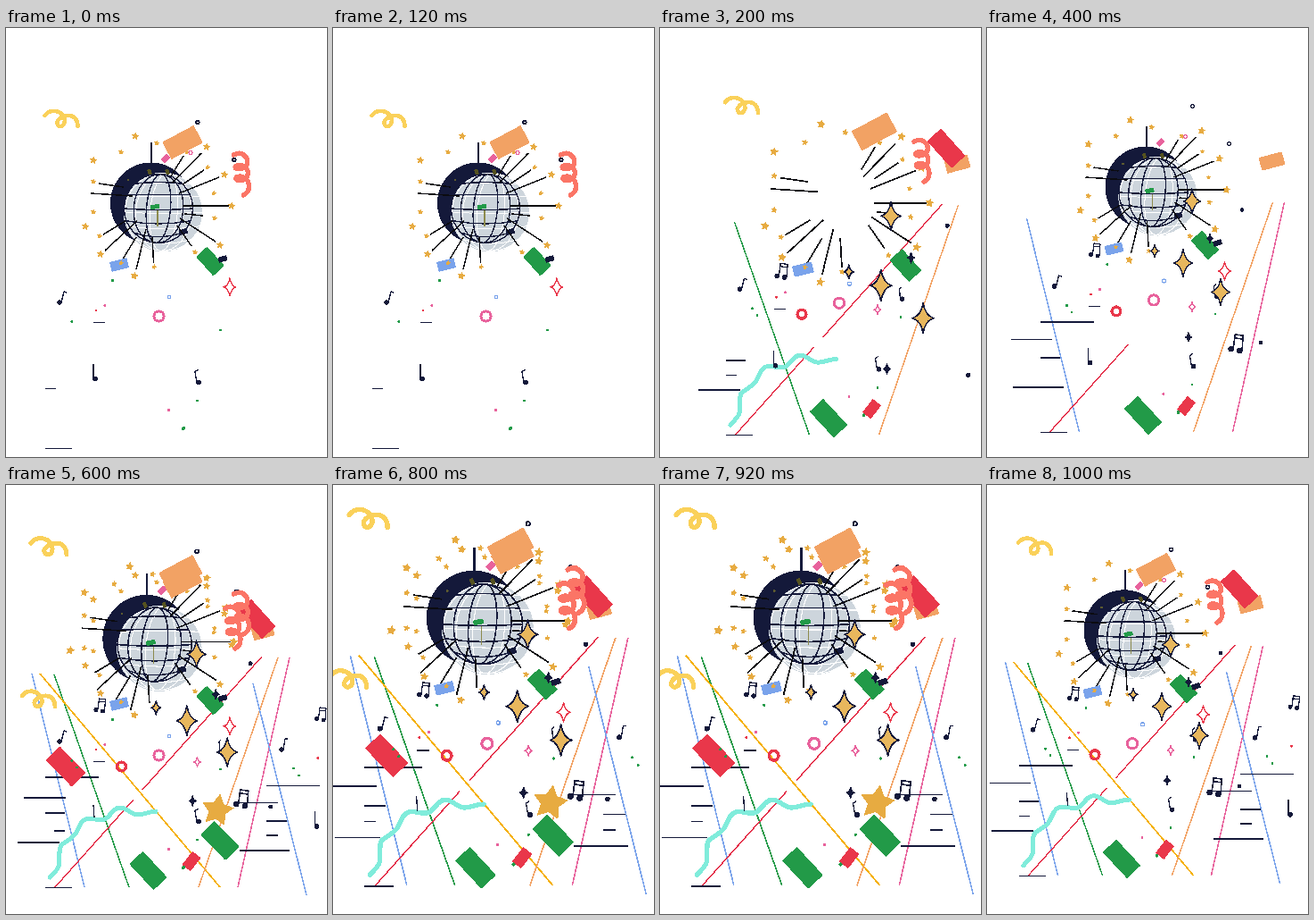
Write an HTML page that moves like this. It is 360x480 px and loops after 1200 ms.

```html
<!DOCTYPE html>
<html lang="en">
<head>
<meta charset="utf-8">
<title>Disco party</title>
<style>
html, body { margin: 0; width: 100%; height: 100%; overflow: hidden; background: #fff; }
svg { display: block; width: 100%; height: 100%; }
</style>
</head>
<body>
<svg id="stage" viewBox="0 0 360 480" shape-rendering="crispEdges"></svg>
<script>
(() => {
const NAVY = '#14193a', GOLD = '#e7ab41', GREEN = '#229a48', RED = '#e9374a';
const ORANGE = '#f2a264', PINK = '#e8629c', BLUE = '#7aa3eb', AQUA = '#80ecdb';
const YELLOW = '#fad15a', CORAL = '#fb7566', BLACK = '#0b0b10';
const ALL = '111111', LATE = '011111', END = '000111', SOLO = '110111';
const STEP = 200;

// Camera pose per beat: scale, x, y
const camera = [[1, 0, 20], [1, 29.5, 5.2], [1, 15.5, 2], [1, 0, 0], [1.078, -12, -36.8], [1, -8.5, -13.2]];
const rest = [1, 0, 0], burst = [1.126, -12, -11], pulse = [1.08, -18, -18];
const zoom = [rest, burst, rest, pulse, pulse, rest];
const zoomLow = [rest, burst, rest, rest, rest, rest];

const parts = [], movers = [];
const stage = document.getElementById('stage');

function add(parent, tag, attrs, mask = ALL) {
  const el = document.createElementNS('http://www.w3.org/2000/svg', tag);
  for (const k in attrs) el.setAttribute(k, attrs[k]);
  parent.appendChild(el);
  if (mask !== ALL) parts.push([el, mask]);
  return el;
}
function group(parent, poses) {
  const el = add(parent, 'g', {});
  if (poses) movers.push([el, poses]);
  return el;
}
const line = (g, x1, y1, x2, y2, color, w = 1.4, mask) =>
  add(g, 'line', { x1, y1, x2, y2, stroke: color, 'stroke-width': w }, mask);
const path = (g, d, color, w, mask, more) =>
  add(g, 'path', { d, fill: 'none', stroke: color, 'stroke-width': w,
    'stroke-linecap': 'round', 'stroke-linejoin': 'round', ...more }, mask);
const rect = (g, x, y, w, h, turn, fill, mask) =>
  add(g, 'rect', { x: -w / 2, y: -h / 2, width: w, height: h, rx: 1, fill,
    transform: `translate(${x} ${y}) rotate(${turn})` }, mask);
const dot = (g, x, y, r, fill, mask) => add(g, 'circle', { cx: x, cy: y, r, fill }, mask);
const ring = (g, x, y, r, color, w, mask) =>
  add(g, 'circle', { cx: x, cy: y, r, fill: 'none', stroke: color, 'stroke-width': w }, mask);
const at = (x, y) => ({ transform: `translate(${x} ${y})` });

function star(g, x, y, r, mask) {
  let points = '';
  for (let i = 0; i < 10; i++) {
    const a = (i * 36 - 80) * Math.PI / 180, d = i % 2 ? r * 0.52 : r;
    points += `${x + d * Math.cos(a)},${y + d * Math.sin(a)} `;
  }
  add(g, 'polygon', { points, fill: GOLD }, mask);
}
function sparkle(g, x, y, h, color, fill, mask) {
  const w = h * 0.7, k = h * 0.15;
  path(g, `M0 ${-h}Q${k} ${-k} ${w} 0Q${k} ${k} 0 ${h}Q${-k} ${k} ${-w} 0Q${-k} ${-k} 0 ${-h}Z`,
    color, 1.4, mask, { fill, ...at(x, y) });
}
function note(g, x, y, dx, dy, flag, mask, r = 2.8) {
  const el = add(g, 'g', {}, mask);
  if (r) dot(el, x, y, r, NAVY);
  path(el, `M${x + Math.sign(dx) * 2} ${y}L${x + dx} ${y + dy}${flag}`, NAVY, 1.3);
}
function pair(g, x, y, s, mask) {
  const el = add(g, 'g', { transform: `translate(${x} ${y}) scale(${s})` }, mask);
  dot(el, -4.5, 5.5, 2.5, NAVY);
  dot(el, 3, 7, 2.5, NAVY);
  path(el, 'M-2.5 5L-1 -7L6 -6L5 7M-1.5 -4L6 -3', NAVY, 1.2);
}

const scene = group(stage, camera);
const back = group(scene);
const upper = group(scene, zoom);
const lower = group(scene, zoomLow);
const flat = group(scene);

// Light beams
line(back, 29, 211, 88, 450, BLUE, 1.5, '001111');
line(back, 54, 212, 138, 450, GREEN, 1.5, '010111');
line(back, 287, 192, 153, 341, '#e4304a', 1.4, '010111');
line(back, 143, 352, 55, 450, '#e4304a', 1.4, LATE);
line(back, 38, 211, 240, 450, '#f5b000', 1.7, END);
line(back, 305, 193, 216, 450, ORANGE, 1.5, LATE);
line(back, 318, 193, 260, 450, PINK, 1.5, '001111');
line(back, 277, 222, 337, 459, BLUE, 1.5, END);

// Floor dashes: x1, x2, y, visible beats
[[98, 111, 309.5, ALL], [44, 74, 450.5, ALL], [44, 104, 327, '001111'],
 [11, 57, 346.5, '001011'], [20, 67, 350, '000100'], [13, 60, 400, '010111'],
 [13, 70, 400, '001000'], [44, 66, 367, LATE], [44, 56, 383.5, '110011'],
 [54, 66, 387, '000100'], [292, 352, 336.5, '000101'], [257, 305, 355.5, END],
 [292, 315, 376, END], [292, 305, 392, END], [262, 318, 409, END]
].forEach(([a, b, y, mask]) => line(back, a, y, b, y, NAVY, 1.5, mask));

// Mirror ball
const ball = add(upper, 'g', {}, '101111');
line(ball, 163, 108, 163, 131, NAVY, 2);
dot(ball, 162.5, 176, 45.5, NAVY);
dot(ball, 176, 186, 44.5, '#cdd5dc');
const net = (cx, cy, r, color, w) => {
  ring(ball, cx, cy, r, color, w);
  for (const k of [0.35, 0.72])
    add(ball, 'ellipse', { cx, cy, rx: r * k, ry: r, fill: 'none', stroke: color,
      'stroke-width': w, transform: `rotate(5 ${cx} ${cy})` });
  for (const k of [-0.72, -0.4, 0, 0.36, 0.7]) {
    const half = r * Math.sqrt(1 - k * k), y = cy + k * r;
    path(ball, `M${cx - half} ${y}Q${cx} ${y + k * 9 + 3} ${cx + half} ${y}`, color, w);
  }
};
net(177, 186, 43.5, '#fff', 1);
net(171, 182, 38.5, NAVY, 1.4);
rect(ball, 161, 141, 4, 6, -25, '#55521f');
rect(ball, 181, 141, 4, 6, -25, '#55521f');
line(ball, 170, 184, 170, 202, '#8c8a4c', 1.5);
dot(ball, 137, 150, 1.3, '#5c5a30');
rect(ball, 167, 180, 10, 5, -12, GREEN);
rect(ball, 199, 208, 9, 6, -15, NAVY);

// Rays around the ball
[[104, 154, 132, 158], [95, 165, 142, 168], [109, 211, 134, 196], [111, 229, 147, 196],
 [129, 242, 146, 214], [146, 250, 157, 205], [165.6, 243, 164, 214], [195, 193, 235, 219],
 [192, 201, 208, 224], [198, 179, 250, 179], [200, 188, 221, 190], [194, 165, 239, 147],
 [198, 155, 222, 139], [187, 153, 219, 120], [185, 146, 199, 123]
].forEach(p => line(upper, ...p, BLACK, 1.5));

// Stars: the upper ones echo at rest size while the ball pulses
[[145, 101, 4.6], [98, 128, 4.6], [225, 113, 4.6], [245, 144, 4.6], [253, 179, 4.6],
 [129, 119, 3.4], [98, 152, 3.4], [98, 186, 3.4], [169, 109, 3.4], [203, 119, 3.2],
 [226, 136, 3], [233, 165, 3]
].forEach(([x, y, r]) => {
  star(upper, x, y, r);
  star(flat, x, y, r, '000110');
});
star(upper, 83.3, 188, 5, '000110');
[[106, 233, 4.6], [144, 257.5, 4.6], [240, 223, 4.6], [89, 202, 4.6],
 [105, 213, 3.2], [166, 247.5, 3.2], [234, 193, 3.2], [212, 231, 3.4]
].forEach(([x, y, r]) => star(lower, x, y, r));

// Confetti
rect(upper, 198, 108, 40, 22, -28, ORANGE, SOLO);
rect(flat, 198, 108, 40, 22, -28, ORANGE, '000110');
rect(upper, 179, 126, 9, 6, -45, PINK, '101111');
rect(lower, 127, 245, 20, 11, -14, BLUE);
star(lower, 129, 243, 3);
rect(lower, 229, 241, 29, 17, 48, GREEN);
rect(lower, 243, 238.5, 10, 6, -18, NAVY, '101111');
rect(flat, 304, 147, 27, 15, -15, ORANGE, '011001');
rect(flat, 288, 164, 24, 15, -15, ORANGE, '000110');
rect(flat, 291.5, 129.5, 41, 21, 48, RED, '010001');
rect(flat, 281, 150, 41, 21, 48, RED, '000110');
rect(flat, 159.5, 431.5, 40, 21, 47, GREEN, LATE);
rect(flat, 208, 421, 19, 12, -52, RED, LATE);
rect(flat, 67, 315, 42, 22, 46, RED, '000110');
rect(flat, 240, 398, 40, 22, 46, GREEN, '000110');
star(flat, 237, 364, 19, '000110');

// Streamers
const curl = 'M-19 -4C-13 -12 -2 -10 2 -3C6 5 0 10 -4 7C-8 2 0 -4 6 -4C13 -5 18 0 18 8';
const swirl = 'M-8 -22C0 -27 9 -20 7 -12C4 -5 -8 -5 -6 -9C0 -14 11 -7 7 2C4 8 -8 8 -5 3C1 0 9 5 9 13C9 19 6 21 3 23';
path(flat, curl, YELLOW, 4.6, '110001', at(62.5, 82));
path(upper, curl, YELLOW, 4.6, '000110', at(61.5, 81));
path(flat, curl, YELLOW, 4.8, '000100', at(37, 240));
path(flat, curl, YELLOW, 4.8, '000010', at(28, 236));
path(flat, swirl, CORAL, 5.4, SOLO, at(263.5, 144));
path(flat, swirl, CORAL, 5.4, '000110', at(254, 160));
path(flat, 'M49.5 439C53 434 60 430 60 423C60 414 59 405 63 402C67 399 74 396 78 390' +
  'C82 384 83 376 89 374C96 371 104 377 111 374C118 370 120 361 128 361' +
  'C137 361 139 369 148 369C155 369 160 365 168 365.5', AQUA, 5, '010111');

// Rings
ring(flat, 171.5, 302.5, 5.6, PINK, 3);
ring(flat, 129.5, 315, 4.9, RED, 3.4, LATE);
ring(flat, 183, 281, 1.9, BLUE, 1.3);
ring(upper, 215, 85.5, 1.9, NAVY, 1.5, '101111');
ring(upper, 207, 119.5, 1.9, PINK, 1.3, '101111');
ring(upper, 256, 127.5, 1.9, NAVY, 1.5, '101111');
dot(upper, 270.5, 201.5, 2.3, NAVY, LATE);
dot(upper, 291.5, 350, 2.3, NAVY, LATE);

// Notes
note(flat, 60, 287, 5, -12, 'l3 1');
note(flat, 100, 372.5, -2, -16, '', '111000');
note(flat, 101, 372, -3, -14, '', END, 0);
note(flat, 216, 376.5, -4, -12, 'l3 -2');
note(flat, 242, 298, -3, -11, 'l2 -2', LATE);
note(flat, 309, 296, 4, -12, 'l3 0', END);
note(flat, 348.5, 382, -2, -16, '', END);
pair(lower, 105.5, 246, 1, LATE);
pair(flat, 264, 350, 1.3, '001111');
pair(flat, 353, 256, 1, '000101');

// Sparkles
const sparks = group(scene, zoom);
[[214.5, 192, 14], [204.5, 261, 15.5], [246.5, 293.5, 15], [172.5, 247.5, 7]
].forEach(p => sparkle(sparks, ...p, NAVY, '#e8b75d', LATE));
sparkle(sparks, 234.5, 233.5, 5, NAVY, NAVY, LATE);
sparkle(sparks, 210.5, 344, 5, NAVY, NAVY, LATE);
sparkle(flat, 214.5, 310, 5.5, PINK, 'none', LATE);
sparkle(flat, 251, 270, 10, RED, '#fff', '101111');

// Small dots
[[119.5, 262.5, GREEN, '101111'], [111, 290.5, PINK], [101, 296, RED], [74, 308.5, GREEN],
 [79.5, 316, GREEN, LATE], [240.5, 318, GREEN], [214.5, 397, GREEN], [182.5, 407.5, PINK],
 [322.5, 317, GREEN, END], [328.5, 325, GREEN, END], [350, 305.5, RED, END]
].forEach(([x, y, c, mask]) => dot(flat, x, y, 1.5, c, mask));
dot(flat, 199, 428, 2, GREEN);

let shown = -1;
function draw(ms) {
  const beat = Math.floor(ms / STEP) % camera.length;
  if (beat === shown) return;
  shown = beat;
  for (const [el, poses] of movers) {
    const [s, x, y] = poses[beat];
    el.setAttribute('transform', `translate(${x} ${y}) scale(${s})`);
  }
  for (const [el, mask] of parts)
    el.setAttribute('display', mask[beat] === '1' ? 'inline' : 'none');
}
const start = performance.now();
function tick() {
  draw(performance.now() - start);
  requestAnimationFrame(tick);
}
tick();
})();
</script>
</body>
</html>
```
